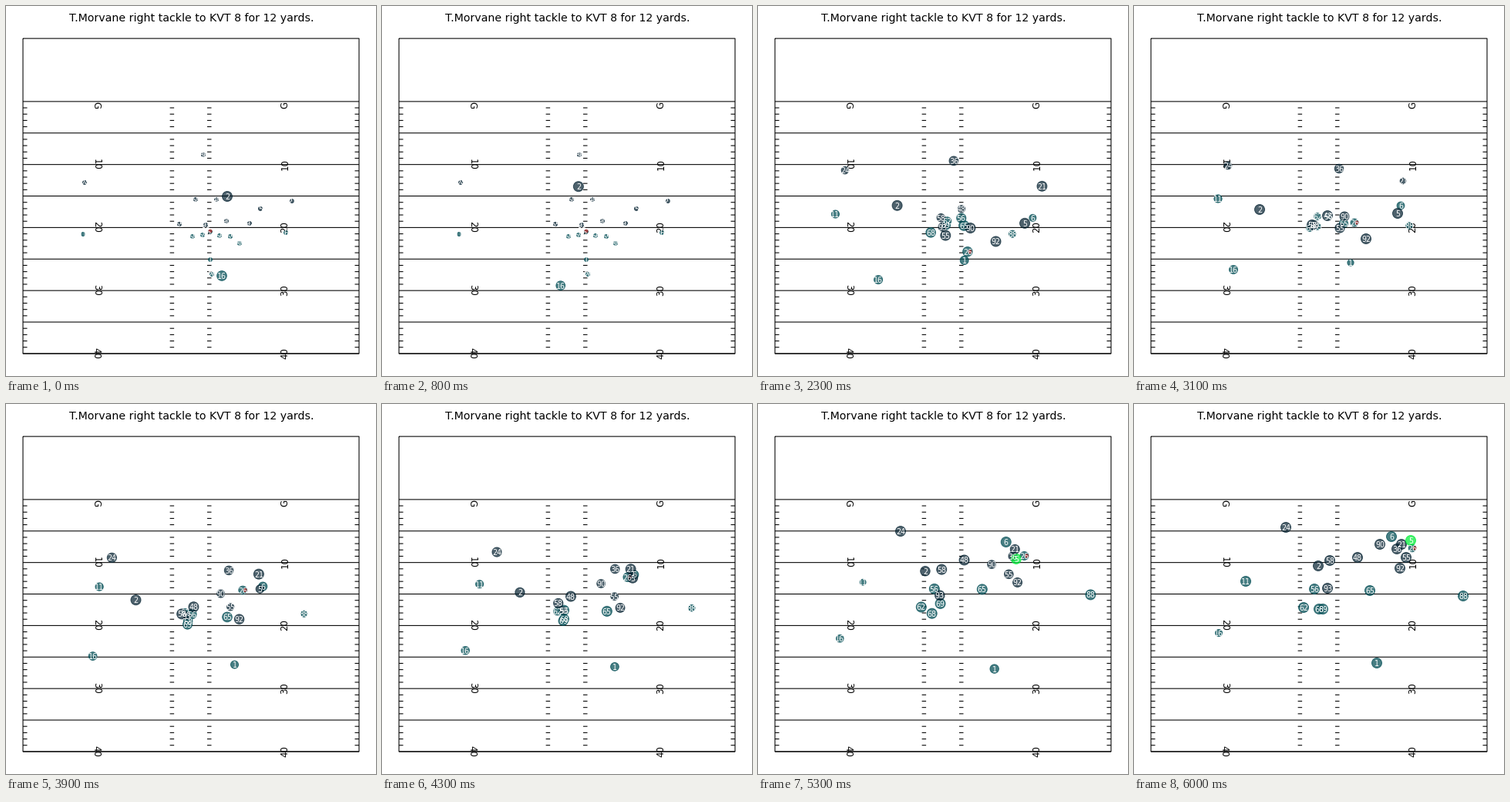
Recreate the animation shown at these times as a matplotlib script. Size 480 px wide and 480 px high, loop 6100 ms.

```python
import numpy as np
import matplotlib.pyplot as plt
from matplotlib.animation import FuncAnimation

SIZE, DPI = 480, 96
PX = 72 / DPI  # points per pixel
FRAMES, STEP = 61, 100

# seconds
SNAP, HANDOFF, TACKLE = 0.95, 1.5, 4.4
TIMES = np.arange(FRAMES) * STEP / 1000
KEYS = np.array([1.5, 3.1, 4.7, 6.0])

# field geometry in pixels
LEFT, RIGHT, TOP, GOAL = 22, 458, 42.1, 123.9
YARD = (RIGHT - LEFT) * 3 / 160

TEAL = (0, 0.298, 0.329, 0.72)
NAVY = (0.012, 0.125, 0.184, 0.7)
LIME = (0, 0.93, 0.22, 0.72)
RED = (0.75, 0.12, 0.12, 0.65)

labels, colors, paths, widths = [], [], [], []


def add(label, color, path, width):
    labels.append(label)
    colors.append(color)
    paths.append(path)
    widths.append(width)


def run(label, color, *points, moving=False):
    """Polynomial path through the points; its acceleration sets the dot size.

    A player waits at the first point until the snap unless already moving.
    """
    points = np.array(points, float)
    start = 0 if moving else SNAP
    powers = np.arange(4) + (1 if moving else 2)
    coef = np.linalg.solve((KEYS - start)[:, None] ** powers,
                           points[1:] - points[0])
    u = np.maximum(TIMES - start, 0)[:, None]
    path = points[0] + u**powers @ coef
    pull = (powers * (powers - 1) * u ** np.maximum(powers - 2, 0)) @ coef
    pull = np.hypot(*pull.T) * (TIMES >= start)
    add(label, color, path, np.minimum(6 + 1.45 * np.sqrt(pull), 14))
    return path


def ease(start, end):
    u = np.clip((TIMES - start) / (end - start), 0, 1)[:, None]
    return u * u * (3 - 2 * u)


# offence
run("11", TEAL, (100, 296), (99, 290), (109, 250), (131, 232), (145, 230))
run("6", TEAL, (363, 294), (362, 289), (346, 259), (323, 204), (334, 172))
run("16", TEAL, (280, 350), (193, 363), (129, 342), (106, 313), (110, 297),
    moving=True)
run("88", TEAL, (303, 308), (309, 305), (357, 285), (416, 257), (427, 249))
run("68", TEAL, (242, 299), (235, 298), (228, 288), (233, 276), (240, 266))
run("69", TEAL, (255, 297), (252, 292), (238, 286), (235, 273), (245, 266))
run("62", TEAL, (265, 293), (259, 289), (238, 273), (221, 267), (220, 264))
run("56", TEAL, (277, 298), (274, 290), (252, 273), (232, 258), (234, 240))
run("65", TEAL, (291, 299), (282, 294), (272, 282), (293, 258), (306, 242))
passer = run("1", TEAL, (265, 329), (264, 329), (281, 333), (305, 343),
             (315, 336))
runner = run("26", TEAL, (267, 348), (267, 343), (286, 281), (330, 211),
             (361, 187))

# defence
run("36", NAVY, (256, 193), (254, 194), (266, 211), (315, 209), (341, 188))
run("24", NAVY, (102, 229), (105, 224), (122, 207), (163, 182), (197, 160))
run("2", NAVY, (287, 247), (217, 244), (163, 264), (193, 233), (239, 210),
    moving=True)
run("21", NAVY, (371, 253), (373, 247), (349, 227), (323, 205), (347, 182))
run("58", NAVY, (246, 251), (244, 257), (231, 284), (231, 241), (254, 203))
run("48", NAVY, (273, 251), (272, 253), (251, 272), (251, 231), (290, 199))
run("55", NAVY, (225, 283), (228, 289), (267, 288), (311, 237), (353, 199))
run("93", NAVY, (259, 284), (253, 285), (234, 284), (235, 260), (251, 239))
run("90", NAVY, (286, 279), (283, 284), (273, 273), (291, 222), (319, 182))
run("92", NAVY, (316, 282), (315, 290), (301, 302), (319, 250), (345, 213))

# the ball goes from the spot to the passer, then travels with the runner
spot, held = np.array([265, 292]), passer + (5, -3)
ball = spot + (held - spot) * ease(SNAP, 1.4)
ball += (runner + (3, 0) - ball) * ease(HANDOFF, 2.1)
add("", RED, ball, np.full(FRAMES, 5))

# the tackler is drawn on top
run("5", NAVY, (330, 263), (336, 271), (342, 269), (325, 214), (359, 177))

paths, widths = np.array(paths), np.array(widths)

fig = plt.figure(figsize=(SIZE / DPI, SIZE / DPI), dpi=DPI, facecolor="white")
ax = fig.add_axes([0, 0, 1, 1])
ax.set_xlim(0, SIZE)
ax.set_ylim(SIZE, 0)
ax.axis("off")


def write(x, y, text, px, **style):
    style = {"va": "center_baseline", **style}
    return ax.text(x, y, text, fontsize=px * PX, ha="center",
                   family="DejaVu Sans", **style)


def line(xs, ys):
    ax.plot(xs, ys, color="black", lw=1.07 * PX, snap=False,
            solid_capstyle="butt", zorder=1)


def draw_field():
    bottom = GOAL + 40 * YARD
    line([LEFT, RIGHT, RIGHT, LEFT, LEFT], [TOP, TOP, bottom, bottom, TOP])
    for yard in range(41):
        y = GOAL + yard * YARD
        if yard % 5 == 0:
            line([LEFT, RIGHT], [y, y])
        else:
            for x in (LEFT, 212.6, 261, RIGHT - 5.5):
                line([x, x + 5.5], [y, y])
        if yard % 10 == 0:
            name, dy = (str(yard), -0.5) if yard else ("G", 4.5)
            for x, turn in ((118.7, -90), (360.4, 90)):
                write(x, y + dy, name, 11.8, rotation=turn,
                      rotation_mode="anchor", zorder=2)


draw_field()
write(240.5, 20, "T.Morvane right tackle to KVT 8 for 12 yards.", 14.1,
      va="baseline")

dots = ax.scatter(*paths[:, 0].T, linewidths=PX, zorder=3)
tags = [write(0, 0, label, 9.5, color="white", zorder=4) for label in labels]


def draw(n):
    shades = list(colors)
    if TIMES[n] >= TACKLE:
        shades[-1] = LIME
    dots.set_offsets(paths[:, n])
    dots.set_sizes(((widths[:, n] - 1) * PX) ** 2)
    dots.set_facecolors(shades)
    dots.set_edgecolors(shades)
    for tag, place in zip(tags, paths[:, n]):
        tag.set_position(place)
    return [dots, *tags]


anim = FuncAnimation(fig, draw, frames=FRAMES, interval=STEP, repeat=True)
plt.show()
```
